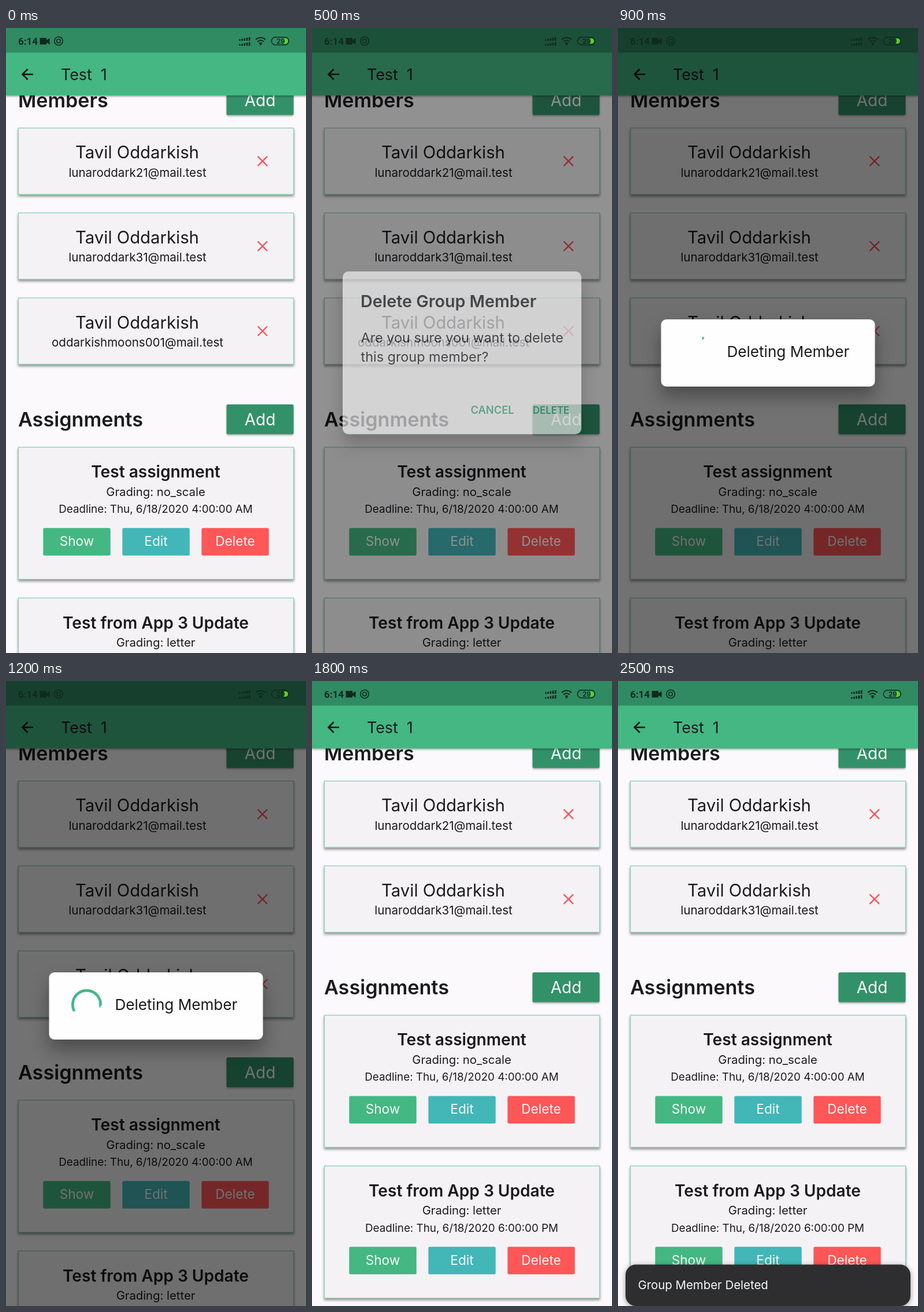
These frames come from a looping animation (519 px wide and 1079 px high, 2600 ms). An HTML page:

```html
<!DOCTYPE html>
<html lang="en">
<head>
<meta charset="utf-8">
<title>Group members</title>
<style>
  html, body { margin: 0; width: 100%; height: 100%; overflow: hidden; background: #fbf9fb; }
  svg { display: block; width: 100%; height: 100%; }
  text { font-family: Inter, "Open Sans", sans-serif; fill: #1b1a1d; white-space: pre; }
  .bold { font-weight: 600; }
  .light { fill: #f4faf7; }
  .action { fill: #3db283; font-weight: 600; }
  .card { fill: #f4f2f4; stroke: #8fd2b5; stroke-width: 1.3; filter: drop-shadow(0 3px 2px rgba(0,0,0,.42)); }
  .raised { filter: drop-shadow(0 2px 1.5px rgba(0,0,0,.3)); }
  .dialog { fill: #fffeff; filter: drop-shadow(0 18px 15px rgba(0,0,0,.33)); }
  .cross { stroke: #f9565b; stroke-width: 2.4; }

  #third, #assignments, #barrier, #confirm, #progress, #snack { animation: 2600ms step-end infinite; }
  #third { animation-name: third; }
  #assignments { animation-name: shift; }
  #barrier { animation-name: dim; }
  #confirm { animation-name: confirm; }
  #progress { animation-name: progress; }
  #snack { animation-name: snack; }
  @keyframes third { 0% { opacity: 1 } 69.23%, 100% { opacity: 0 } }
  @keyframes shift { 0% { transform: none } 69.23%, 100% { transform: translateY(-146.7px) } }
  @keyframes dim { 0% { opacity: 0 } 19.23% { opacity: .42 } 23.07% { opacity: .54 } 69.23%, 100% { opacity: 0 } }
  @keyframes confirm { 0% { opacity: 0 } 19.23% { opacity: .61 } 23.07% { opacity: 1 } 34.61%, 100% { opacity: 0 } }
  @keyframes progress { 0% { opacity: 0 } 34.61% { opacity: 1 } 69.23%, 100% { opacity: 0 } }
  @keyframes snack { 0% { opacity: 0 } 92.3% { opacity: .95 } 96.15%, 100% { opacity: 1 } }

  /* Two spinner cycles of 529 ms: the head runs out, then the tail catches up, while the ring turns evenly. */
  #arc {
    fill: none; stroke: #43b585; stroke-width: 4.8;
    transform-origin: 139.5px 558.5px;
    animation: turn 2600ms linear infinite, sweep 2600ms cubic-bezier(.4, 0, .2, 1) infinite;
  }
  @keyframes turn {
    0%, 33.65% { transform: rotate(-90deg) }
    74.35%, 100% { transform: rotate(522deg) }
  }
  @keyframes sweep {
    0%, 33.65% { stroke-dasharray: 0 360; stroke-dashoffset: 0 }
    43.83% { stroke-dasharray: 270 90; stroke-dashoffset: 0 }
    54% { stroke-dasharray: 0 360; stroke-dashoffset: -270 }
    64.18% { stroke-dasharray: 270 90; stroke-dashoffset: -270 }
    74.35%, 100% { stroke-dasharray: 0 360; stroke-dashoffset: -540 }
  }
</style>
</head>
<body>
<svg id="stage" viewBox="0 0 519 1079" preserveAspectRatio="none"></svg>
<script>
const label = (x, y, size, words, cls = '', anchor = 'start') =>
  `<text x="${x}" y="${y}" font-size="${size}" class="${cls}" text-anchor="${anchor}">${words}</text>`;
const centered = (x, y, size, words, cls) => label(x, y, size, words, cls, 'middle');
const box = (x, y, w, h, attrs) => `<rect x="${x}" y="${y}" width="${w}" height="${h}" ${attrs}/>`;
const group = (id, content) => `<g id="${id}">${content}</g>`;

const button = (x, y, w, h, fill, words, size, baseline, cls = '') =>
  box(x, y, w, h, `rx="2.5" fill="${fill}" class="${cls}"`) +
  centered(x + w / 2, y + baseline, size, words, 'light');

const addButton = y => button(381.5, y, 116, 51.5, '#33916a', 'Add', 28, 36, 'raised');

const member = (y, name, mail) =>
  box(21.5, y, 476, 114.5, 'class="card"') +
  centered(227, y + 52.5, 29.3, name) +
  centered(227.5, y + 84, 20.5, mail) +
  `<path class="cross" d="M435.5 ${y + 49}l16.5 16.5m0-16.5l-16.5 16.5"/>`;

const assignment = (y, title, grading, deadline) =>
  box(21.5, y, 476, 228, 'class="card"') +
  centered(259, y + 52.5, 28.1, title, 'bold') +
  centered(259, y + 84, 20.3, 'Grading: ' + grading) +
  centered(259, y + 113.5, 18.8, 'Deadline: Thu, 6/18/2020 ' + deadline) +
  [['Show', '#44b783'], ['Edit', '#43b6b7'], ['Delete', '#ff5657']].map(([words, fill], i) =>
    button(64.3 + i * 137, y + 139.5, 116.4, 47.5, fill, words, 22.6, 31)).join('');

const bars = bottom => [0, 1, 2, 3, 4].map(i =>
  box(403 + i * 4.2, bottom - 2.5 - i * .9, 2.7, 2.5 + i * .9, '')).join('');

const statusIcons = `<g fill="#102a1e">
  <text x="21" y="29" font-size="17" style="font-family:Roboto,sans-serif;font-weight:600;fill:#102a1e">6:14</text>
  <path d="M58.5 17h11.5v4l5.5-3.5v11l-5.5-3.5v3.5h-11.5z"/>
  <g fill="none" stroke="#102a1e" stroke-width="1.6">
    <circle cx="91" cy="22.5" r="7.2"/><circle cx="91" cy="22.5" r="3.3"/>
    <path d="M432 20q8.5-7 17 0M435 23.5q5.5-4.5 11 0M438 26.8q2.5-2 5 0" stroke-width="2"/>
  </g>
  <circle cx="440.5" cy="28.3" r="1.6"/>
  ${bars(22)}${bars(30.5)}
  <rect x="459.3" y="15.8" width="30" height="13.5" rx="6.7" fill="none" stroke="#102a1e" stroke-width="1.5"/>
  <path d="M480 18h3.5a4.5 4.5 0 0 1 0 9h-3.5z" fill="#58d51d"/>
  <text x="468" y="27" font-size="11.5" class="bold" style="fill:#102a1e">29</text>
</g>`;

const name = 'Tavil Oddarkish';

document.getElementById('stage').innerHTML =
  box(0, 0, 519, 1079, 'fill="#fbf9fb"') +
  label(21, 137, 34, 'Members', 'bold') + addButton(98.7) +
  member(172.7, name, 'lunaroddark21@mail.test') +
  member(319.3, name, 'lunaroddark31@mail.test') +
  group('third', member(466, name, 'oddarkishmoons001@mail.test')) +
  group('assignments',
    label(21, 688, 34.2, 'Assignments', 'bold') + addButton(649.7) +
    assignment(723.7, 'Test assignment', 'no_scale', '4:00:00 AM') +
    assignment(984, 'Test from App 3 Update', 'letter', '6:00:00 PM')) +
  box(0, 0, 519, 116.5, 'fill="#44b783" class="raised"') +
  box(0, 0, 519, 42.5, 'fill="#308b62"') +
  '<path d="M47 80H28.5m9-9l-9 9 9 9" fill="none" stroke="#07120d" stroke-width="2.6"/>' +
  label(95, 89.5, 26.8, 'Test  1') +
  group('snack',
    box(13, 1007.5, 493, 71.5, 'rx="18" fill="#2e2d2f" style="filter:drop-shadow(0 2px 5px rgba(0,0,0,.4))"') +
    label(34.5, 1050, 20.4, 'Group Member Deleted', 'light')) +
  group('barrier', box(0, 0, 519, 1079, '')) +
  group('confirm',
    box(53, 420.3, 413, 281, 'rx="10" class="dialog"') +
    label(84, 482, 28.7, 'Delete Group Member', 'bold') +
    label(84.5, 543, 23.4, 'Are you sure you want to delete') +
    label(84.5, 576, 23.4, 'this group member?') +
    label(274.5, 666, 18.3, 'CANCEL', 'action') +
    label(382, 666, 16.8, 'DELETE', 'action')) +
  group('progress',
    box(74.5, 503, 370, 116, 'rx="9" class="dialog"') +
    '<circle id="arc" cx="139.5" cy="558.5" r="24.2" pathLength="360"/>' +
    label(188.5, 567.5, 26.1, 'Deleting Member')) +
  statusIcons;
</script>
</body>
</html>
```
